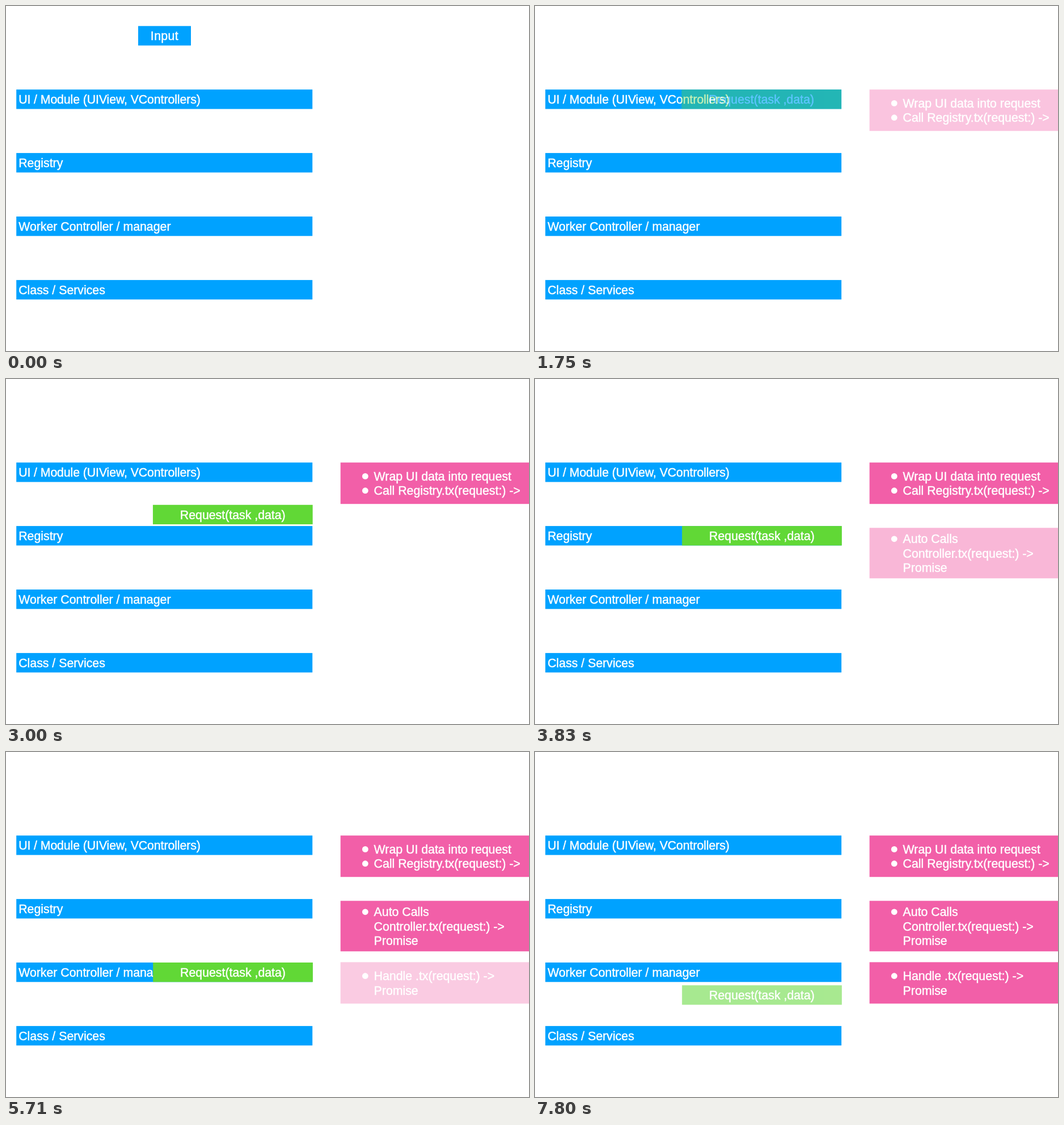
Animation of 922 by 608 pixels, one loop 8 s. Source, as an HTML page:

```html
<!DOCTYPE html>
<html lang="en">
<head>
<meta charset="utf-8">
<title>Request flow</title>
<style>
  html, body { margin: 0; width: 100%; height: 100%; overflow: hidden; background: #fff; }
  svg { display: block; width: 922px; height: 608px; }
  text {
    font: 21.3px "Liberation Sans", Arial, sans-serif;
    fill: #fff; stroke: #fff; stroke-width: .45px; white-space: pre;
  }
</style>
</head>
<body>
<svg id="stage" viewBox="0 0 922 608"></svg>
<script>
const BLUE = '#00a2ff', GREEN = '#61d836', PINK = '#f25fa8';
const LOOP = 8000, FIRST = 500, STEP = 1250 / 6;
const BAR_H = 34.3, GAP = 111.9, LINE = 25.3;
const stage = document.getElementById('stage');

function add(parent, tag, attrs, content) {
  const el = document.createElementNS('http://www.w3.org/2000/svg', tag);
  for (const key in attrs) el.setAttribute(key, attrs[key]);
  if (content) el.textContent = content;
  return parent.appendChild(el);
}

function box(x, y, width, height, fill) {
  const g = add(stage, 'g', {});
  add(g, 'rect', { x, y, width, height, fill });
  return g;
}

function bar(y, label, spacing = 0) {
  const g = box(18.2, y, 522, BAR_H, BLUE);
  add(g, 'text', { x: 22.2, y: y + 25, 'letter-spacing': spacing }, label);
}

// Moving tags are drawn at the origin and placed by transform.
function tag(width, fill, label, spacing = 0) {
  const g = box(0, 0, width, BAR_H, fill);
  add(g, 'text', { x: width / 2, y: 25, 'text-anchor': 'middle', 'letter-spacing': spacing }, label);
  return g;
}

// Lines starting with "*" get a bullet.
function note(y, height, firstLine, lines) {
  const g = box(589.7, y, 340, height, PINK);
  lines.forEach((line, i) => {
    const base = firstLine + i * LINE;
    if (line[0] === '*') add(g, 'circle', { cx: 633.3, cy: base - 7.6, r: 5.4, fill: '#fff' });
    add(g, 'text', { x: 648.6, y: base }, line.replace('*', ''));
  });
  return g;
}

bar(147.2, 'UI / Module (UIView, VControllers)', -0.1);
bar(259.1, 'Registry');
bar(371, 'Worker Controller / manager');
bar(482.9, 'Class / Services');

const notes = [
  note(147.2, 73, 179, ['*Wrap UI data into request', '*Call Registry.tx(request:) ->']),
  note(262.3, 89, 289.4, ['*Auto Calls', 'Controller.tx(request:) ->', 'Promise']),
  note(370.4, 73, 402.3, ['*Handle .tx(request:) ->', 'Promise'])
];
const input = tag(93, BLUE, 'Input', 0.4);
const request = tag(281.7, GREEN, 'Request(task ,data)');

// Start times of each one-second build.
const INPUT_MOVE = 387, NOTES_IN = [1387, 3387, 5387], MOVES = [2387, 4387, 7387];

const ramp = (t, start, length = 1000) => Math.min(1, Math.max(0, (t - start) / length));
const ease = p => p * p * (3 - 2 * p);

function place(el, x, y, opacity) {
  el.setAttribute('transform', `translate(${x} ${y})`);
  el.setAttribute('opacity', opacity);
}

function draw(t) {
  place(input, 233, 35.3 + GAP * ease(ramp(t, INPUT_MOVE)), 1 - ramp(t, INPUT_MOVE, 900));

  const hops = MOVES.map(start => ease(ramp(t, start)));
  const travelled = hops.reduce((sum, hop) => sum + hop, 0);
  const fade = ramp(t, NOTES_IN[0]) * (1 - ramp(t, MOVES[2], 900));
  place(request, 258.4 + 0.8 * hops[0], 147.2 + GAP * travelled, fade);

  notes.forEach((el, i) => el.setAttribute('opacity', ramp(t, NOTES_IN[i])));
}

// The picture advances in steps of 4.8 per second after an initial hold.
function heldTime(t) {
  const step = Math.floor((t - FIRST + 6) / STEP);
  return step < 0 ? 0 : FIRST + step * STEP;
}

const begin = performance.now();
function tick() {
  draw(heldTime((performance.now() - begin) % LOOP));
  requestAnimationFrame(tick);
}
draw(0);
requestAnimationFrame(tick);
</script>
</body>
</html>
```
